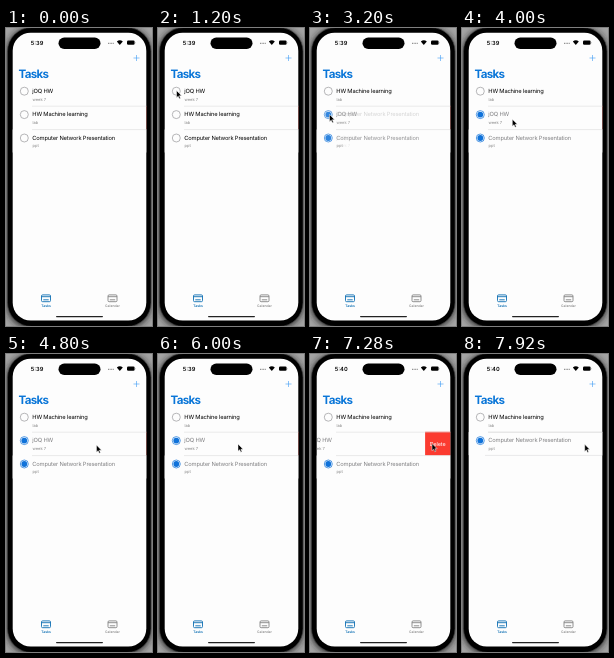
An HTML page that plays this animation: 146x298 px, repeating every 8000 ms.

```html
<!DOCTYPE html>
<html lang="en">
<head>
<meta charset="utf-8">
<title>Tasks</title>
<style>
  html, body { margin: 0; width: 100%; height: 100%; overflow: hidden; background: #a4a4a4; }
  svg { display: block; width: 146px; height: 298px; }
  text { font-family: Inter, Roboto, sans-serif; text-rendering: geometricPrecision; }
  .heading { font-size: 11.6px; font-weight: 700; letter-spacing: -.76px; fill: #0a76d8; }
  .clock { font-size: 5.7px; font-weight: 600; }
  .title { font-size: 5.75px; letter-spacing: -.16px; }
  .note { font-size: 4.05px; fill: #858585; }
  .tab { font-size: 3.4px; font-weight: 600; text-anchor: middle; }
  .delete { font-size: 5.5px; letter-spacing: -.14px; fill: #fff; text-anchor: middle; }
  .line { stroke: #d4d4d6; stroke-width: .5; }
</style>
</head>
<body>
<svg viewBox="0 0 146 298">
  <defs>
    <clipPath id="screen"><rect x="6.7" y="4.7" width="133.6" height="287.8" rx="18"/></clipPath>
    <clipPath id="slot"><rect x="6" y="77.8" width="135" height="23.7"/></clipPath>
    <filter id="soft" x="-20%" y="-20%" width="140%" height="140%"><feGaussianBlur stdDeviation="3"/></filter>
    <g id="card" fill="none" stroke="currentColor" stroke-width=".9">
      <rect x="-4.5" y="-3.4" width="9" height="6.8" rx="1.1"/>
      <path d="M-4.5-1.6h9M-2.7 1.5h5.4"/>
    </g>
  </defs>
  <rect x="1" y="0" width="144" height="300" rx="24" fill="#222" filter="url(#soft)"/>
  <rect x="1.5" y="-.5" width="143.5" height="299" rx="24" stroke="#444" stroke-width=".6"/>
  <g clip-path="url(#screen)">
    <rect x="6" y="4" width="135" height="289" fill="#fdfdfd"/>
    <g id="rows"></g>
    <path class="line" d="M26 78.2H141"/>
    <text class="heading" x="12.6" y="50.3">Tasks</text>
    <path d="M130.5 27v6M127.5 30h6" stroke="#3d9bf3" stroke-width=".6"/>
    <text class="clock" id="clock" x="24.8" y="17"></text>
    <rect x="52.5" y="9.5" width="42" height="11.5" rx="5.75"/>
    <path d="M102 15.3h6" stroke="#777" stroke-width="1" stroke-dasharray="1 .6"/>
    <path d="M110.8 13.6q3-2.7 6 0l-3 3.3z"/>
    <rect x="121" y="12.5" width="7.6" height="4.2" rx="1.2"/>
    <path d="M129.2 14v1.3" stroke="#999" stroke-width=".6"/>
    <use href="#card" x="40" y="270.3" color="#0f70b4"/>
    <text class="tab" x="40" y="279" fill="#0f70b4">Tasks</text>
    <use href="#card" x="106.5" y="270.3" color="#858585"/>
    <text class="tab" x="106.5" y="279" fill="#8c8c8c">Calendar</text>
    <rect x="50" y="287.9" width="47" height="1.3" rx=".65" fill="#222"/>
  </g>
  <path id="cursor" d="M0 0V7.2L1.7 5.7L2.8 8.2L4 7.7L2.9 5.2H5.1Z" stroke="#fff" stroke-width=".5"/>
</svg>
<script>
const LOOP = 8000, STEP = 80, PITCH = 23.4;
const FIRST = 1440, SECOND = 2960, REMOVE = 7360, NEVER = 9000;
const $ = id => document.getElementById(id);

const tasks = {
  app: ["jOQ HW", "week 7"],
  learn: ["HW Machine learning", "lab"],
  net: ["Computer Network Presentation", "ppt"]
};

// task, slot, done, shown from, shown until
const layout = [
  ["app", 0, false, -1000, FIRST],
  ["learn", 0, false, FIRST, NEVER],
  ["learn", 1, false, -1000, FIRST],
  ["net", 1, false, FIRST, SECOND],
  ["app", 1, true, SECOND, NEVER],
  ["net", 2, false, -1000, FIRST],
  ["app", 2, true, FIRST, SECOND],
  ["net", 2, true, SECOND, NEVER]
];

// time, value...
const cursorPath = [
  [0, 150, 122], [80, 144, 118], [480, 92, 90], [880, 38, 68], [1200, 18.5, 62.5],
  [2000, 18.5, 62.5], [2720, 19.5, 86.5], [3520, 19.5, 86.5], [4160, 56, 92],
  [4640, 90.5, 91], [5440, 90, 91], [5840, 84, 90.5], [6000, 80, 90], [6320, 55, 90],
  [6560, 55, 90], [7120, 122, 89.5], [7360, 122, 89.5], [7920, 122.7, 90.3]
];
const swipePath = [[6000, 0], [6320, -25.3], [REMOVE, -25.3], [7600, -134]];
const closePath = [[7440, 0], [7760, -PITCH]];

const smooth = p => p * p * (3 - 2 * p);
function at(path, t) {
  const i = path.findIndex(k => k[0] > t);
  if (i === 0) return path[0].slice(1);
  if (i < 0) return path[path.length - 1].slice(1);
  const a = path[i - 1], b = path[i], p = smooth((t - a[0]) / (b[0] - a[0]));
  return a.slice(1).map((v, n) => v + (b[n + 1] - v) * p);
}
const fade = (t, start) => smooth(Math.min(1, Math.max(0, (t - start) / 320)));
const move = (el, x, y) => el.setAttribute("transform", `translate(${x} ${y})`);

function rowMarkup([key, slot, done]) {
  const [title, note] = tasks[key];
  const ring = done ? "#0f72da" : "#98989b";
  return `<g transform="translate(0 ${slot * PITCH})">
    <circle cx="18.3" cy="63.2" r="4" fill="none" stroke="${ring}" stroke-width=".7"/>
    ${done ? '<circle cx="18.3" cy="63.2" r="2.9" fill="#0f72da"/>' : ""}
    <text class="title" x="26.3" y="65" fill="${done ? "#808083" : "#000"}">${title}</text>
    <text class="note" x="26.5" y="72.6">${note}</text></g>`;
}

$("rows").innerHTML = layout.slice(0, 4).map(r => `<g class="row">${rowMarkup(r)}</g>`).join("") +
  `<g id="middle" clip-path="url(#slot)"><g class="row">${rowMarkup(layout[4])}</g>
    <rect id="red" y="77" width="134" height="26" fill="#fb3b30"/>
    <text id="label" class="delete" y="92">Delete</text></g>
  <g id="lower"><rect x="6" y="101.5" width="135" height="23" fill="#fdfdfd"/>
    <path class="line" d="M26 101.6H141"/>
    ${layout.slice(5).map(r => `<g class="row">${rowMarkup(r)}</g>`).join("")}
    <path id="tail" class="line" d="M23 124.8H141"/></g>`;
const rows = [...document.querySelectorAll(".row")];

function draw(t) {
  const [swipe] = at(swipePath, t), [close] = at(closePath, t);
  layout.forEach(([, , , from, until], i) => {
    rows[i].setAttribute("opacity", fade(t, from) * (1 - fade(t, until)));
  });
  move(rows[4], swipe, 0);
  $("red").setAttribute("x", 140.4 + swipe);
  $("label").setAttribute("x", 140.4 + swipe + 12.5);
  $("label").setAttribute("opacity", swipe < 0 ? 1 : 0);
  $("middle").setAttribute("opacity", close > -PITCH ? 1 : 0);
  move($("lower"), 0, close);
  $("tail").setAttribute("opacity", close < 0 ? 1 : 0);
  $("clock").textContent = t < 6160 ? "5:39" : "5:40";
  move($("cursor"), ...at(cursorPath, t));
}

const start = performance.now();
function tick() {
  const t = (performance.now() - start) % LOOP;
  draw(Math.floor(t / STEP) * STEP);
  requestAnimationFrame(tick);
}
tick();
</script>
</body>
</html>
```
